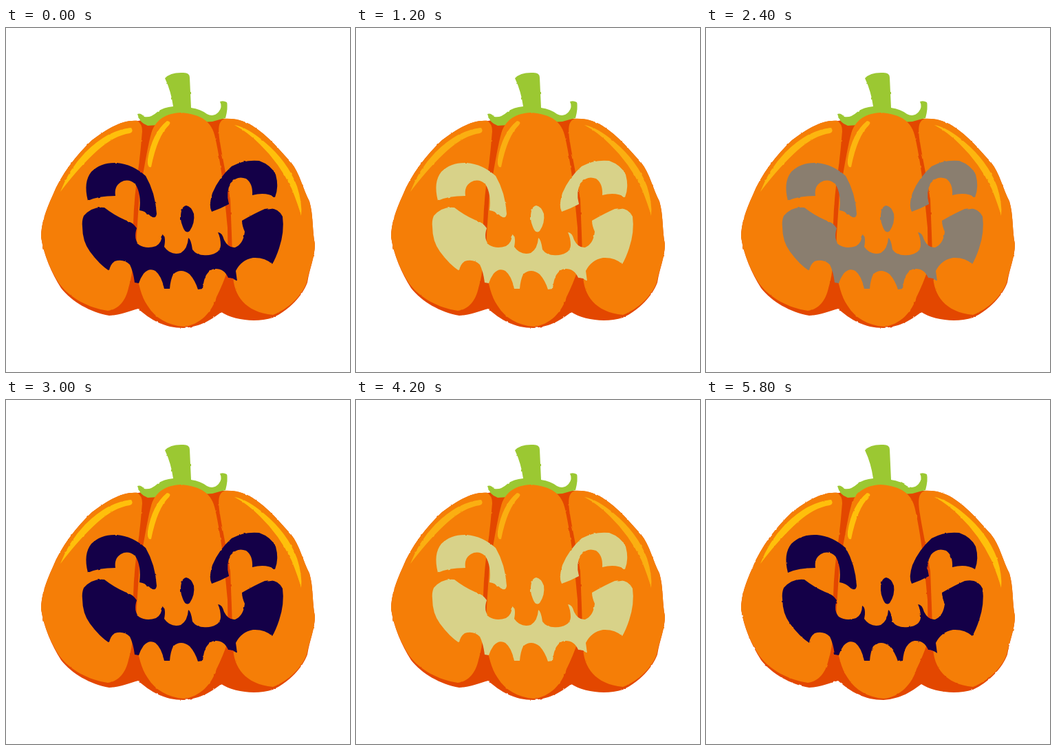
These frames come from a looping animation (500 by 500 pixels, 6.01 s). An HTML page:

```html
<!DOCTYPE html>
<html lang="en">
<head>
<meta charset="utf-8">
<title>Pumpkin lantern</title>
<style>
  html, body { margin: 0; width: 100%; height: 100%; overflow: hidden; background: #fff; }
  svg { display: block; width: 100vw; height: 100vh; }
</style>
</head>
<body>
<svg viewBox="0 0 500 500">
  <filter id="rough" x="0" y="0" width="500" height="500" filterUnits="userSpaceOnUse" color-interpolation-filters="sRGB">
    <feTurbulence id="noise" type="fractalNoise" baseFrequency=".12" numOctaves="2" seed="1"/>
    <feDisplacementMap in="SourceGraphic" scale="2" xChannelSelector="R" yChannelSelector="G"/>
  </filter>
  <g filter="url(#rough)">
    <!-- shaded body -->
    <path fill="#e34700" d="M192 135C168 133 147 147 125 163C102 185 80 213 68 243C58 265 51 284 51 304C55 330 66 356 80 378C96 398 122 413 150 418C168 417 180 411 192 408C210 424 230 436 258 436C284 434 298 424 313 413C330 424 362 429 388 421C412 410 431 389 438 370C441 350 449 333 449 314C445 296 447 272 441 252C432 235 427 211 414 195C398 178 382 157 358 142C343 133 327 131 312 132L250 123Z"/>
    <!-- stem -->
    <path fill="#9bc832" d="M231 73Q239 64 258 65Q267 65 267 72L269 116Q283 118 292 125Q302 130 309 122Q315 115 311 107Q316 105 321 108Q323 116 319 131Q310 133 300 136L206 142Q194 138 191 125Q196 123 201 129Q210 131 220 122Q229 115 243 114Q240 92 231 73Z"/>
    <!-- lobes -->
    <g fill="#f57e07">
      <path d="M191 135C168 133 147 147 125 163C102 185 80 213 68 243C58 265 51 284 51 304C55 330 66 354 77 371C92 392 120 407 148 411C164 409 174 396 178 378Q184 358 184 342L185 285Q186 245 193 200Q196 176 198 150Q198 139 191 135Z"/>
      <path d="M254 123C232 124 219 133 212 150C206 170 201 205 194 240L190 300L188 350C193 372 196 390 206 404C217 422 236 432 258 434C282 432 300 412 306 391Q315 373 323 350L322 290C319 258 314 203 304 159C300 137 284 125 254 123Z"/>
      <path d="M318 132C308 135 308 147 311 166C314 186 320 212 326 249L328 300L330 360C331 388 347 413 388 417C412 408 431 387 437 370C441 350 449 333 449 314C445 296 447 272 441 252C432 235 427 211 414 195C398 178 382 157 358 142C345 134 332 131 318 132Z"/>
    </g>
    <g id="shine" fill="#ffc00b">
      <path d="M182 145Q186 151 180 153Q158 156 134 177Q108 200 79 238Q91 206 115 181Q148 148 182 145Z"/>
      <path d="M234 135Q241 136 237 141Q220 157 211 202Q205 204 206 191Q212 153 234 135Z"/>
      <path d="M332 141Q350 144 375 165Q409 193 423 230Q431 255 429 273Q425 258 415 233Q397 196 369 169Q351 151 332 141Z"/>
    </g>
    <g id="face">
      <path d="M119 251Q112 224 124 209Q138 195 161 196Q184 198 203 215Q217 239 219 270Q218 278 211 274Q203 266 194 265Q197 241 188 227Q178 218 167 224Q157 230 159 244Q134 244 119 251Z"/>
      <path d="M299 267Q294 258 300 240Q309 218 328 201Q346 191 368 193Q385 199 392 213Q397 231 391 246Q378 238 358 243Q359 226 349 219Q336 214 327 225Q319 238 324 256Q313 262 299 267Z"/>
      <path d="M262 258Q269 259 273 270Q275 283 267 295Q261 300 257 289Q252 278 255 265Q257 259 262 258Z"/>
      <path d="M113 273Q125 259 143 261Q157 272 173 279Q184 282 190 291Q185 306 193 315Q204 322 218 317Q227 312 227 299Q233 302 230 318Q239 331 254 327Q264 321 265 305Q269 307 271 322Q278 332 294 330Q311 328 312 316Q312 305 308 297Q314 297 317 308Q323 320 333 319Q345 314 347 296Q343 287 343 280Q362 269 376 263Q395 259 402 274Q405 296 397 320Q392 335 387 343Q376 333 359 334Q342 337 334 353L336 368Q329 363 323 363Q317 349 303 350Q288 353 286 379L279 380Q275 367 267 358Q254 348 243 358Q239 366 238 379L230 379Q226 360 217 353Q208 348 200 357Q195 364 193 371L187 370Q185 354 180 344Q171 335 158 339Q151 344 150 353Q136 344 122 325Q111 310 111 289Q110 280 113 273Z"/>
    </g>
  </g>
</svg>
<script>
const LOOP = 6010, STEP = 200, CYCLE = 15;
const $ = id => document.getElementById(id);
const clamp = x => Math.min(1, Math.max(0, x));
const mix = (a, b, t) => `rgb(${a.map((v, i) => Math.round(v + (b[i] - v) * t))})`;
const seeds = [4, 9, 17];
const noise = $("noise"), face = $("face"), shine = $("shine");
let last = -1;

// The light swells, holds, then dies within each cycle.
const glow = k => k <= 10 ? clamp((k - 1) / 6) : clamp((14 - k) / 4);

function draw(now) {
  const step = Math.min(29, Math.floor(now % LOOP / STEP));
  if (step !== last) {
    last = step;
    const light = glow(step % CYCLE);
    noise.setAttribute("seed", seeds[step % 3]);
    face.setAttribute("fill", mix([20, 0, 72], [255, 252, 150], light));
    shine.setAttribute("fill", mix([255, 192, 11], [250, 172, 18], light));
  }
  requestAnimationFrame(draw);
}
draw(performance.now());
</script>
</body>
</html>
```
